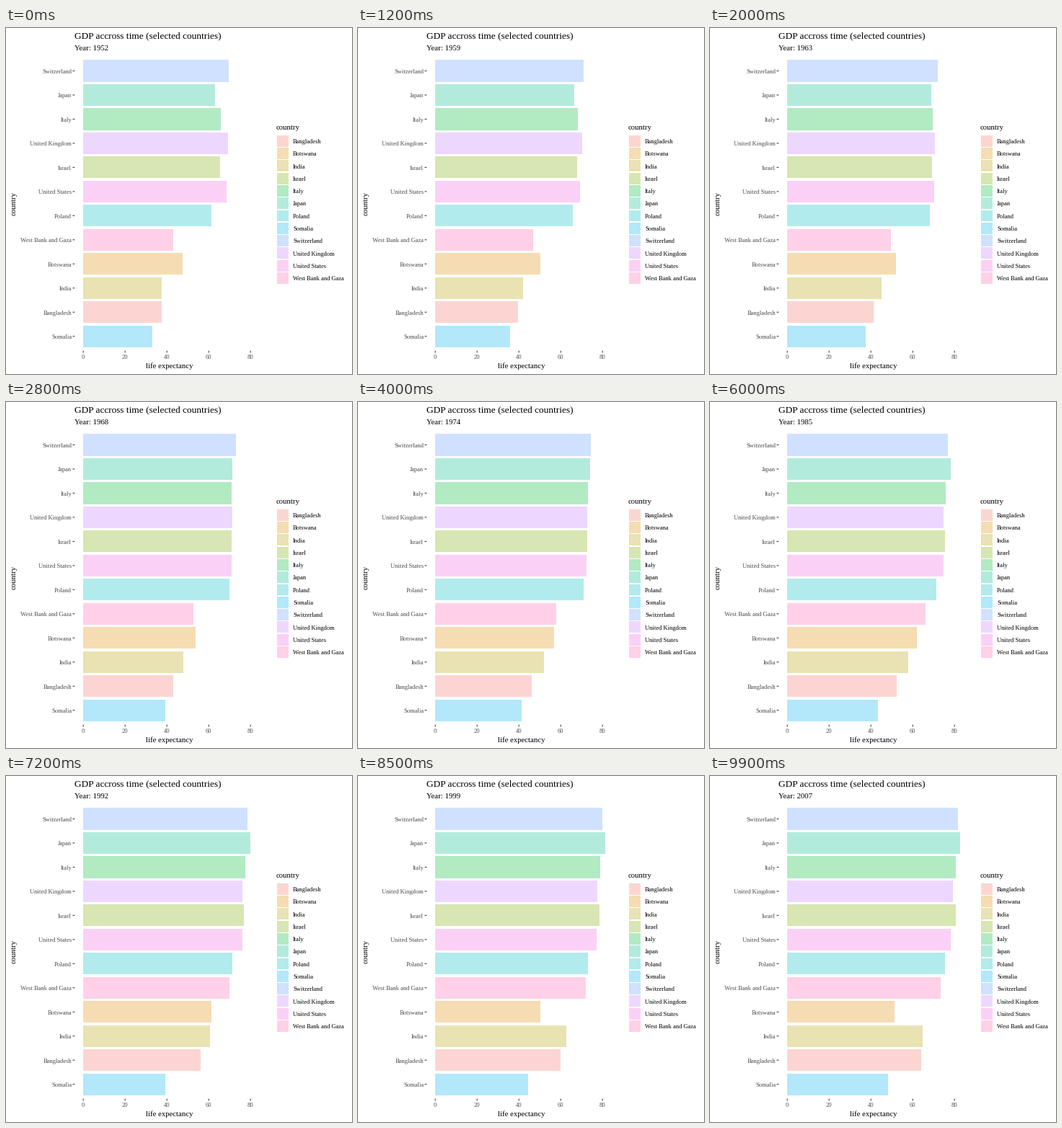
Recreate the animation shown at these times as a matplotlib script. Size 480 by 480 pixels, loop 10 s.

```python
import matplotlib.pyplot as plt
import numpy as np
from matplotlib.animation import FuncAnimation
from matplotlib.patches import Rectangle

plt.rcParams["font.family"] = "Liberation Serif"

SIZE, DPI = 480, 72
FRAMES, INTERVAL = 100, 100
YEARS = np.arange(1952, 2008, 5)

X0, X_UNIT = 107.2, 2.9          # zero line, pixels per year of life
ROW0, ROW = 59.52, 33.47         # first bar centre, bar pitch
LEFT, BOTTOM, TICK = 95.3, 447.7, 2.75
KEY_X, KEY_Y, KEY, PAD = 375.2, 148.2, 17.28, 0.71
SMALL, MEDIUM, LARGE = 8.45, 10.8, 13.4
GREY = "#4D4D4D"


def life(start, end, bend=0, skew=0, dip=0, when=2000, spread=1):
    """Straight trend, bowed by two sine waves, with an optional crisis."""
    u = (YEARS - YEARS[0]) / (YEARS[-1] - YEARS[0])
    trend = start + (end - start) * u
    bow = bend * np.sin(np.pi * u) + skew * np.sin(2 * np.pi * u)
    return trend + bow - dip * np.exp(-((YEARS - when) / spread) ** 2 / 2)


LIFE = {
    "Switzerland": life(69.6, 81.7),
    "Japan": life(63, 82.6, 3.4),
    "Italy": life(65.9, 80.5, 1.2),
    "United Kingdom": life(69.2, 79.4, -0.8),
    "Israel": life(65.4, 80.7, 0.9, 0.4),
    "United States": life(68.4, 78.2, 0.2, -0.4),
    "Poland": life(61.3, 75.6, 2.8, 2.4),
    "West Bank and Gaza": life(43.2, 73.4, 3.7, -1.9),
    "Botswana": life(47.6, 71.5, 0, -0.5, dip=24, when=2003.4, spread=6.1),
    "India": life(37.4, 64.7, 3.9, -0.3),
    "Bangladesh": life(37.5, 64.1, -1.8, -0.5),
    "Somalia": life(33, 48.2, 1.9, 0.4, dip=6.6, when=1993.6, spread=3),
}


def hcl(hue, chroma=100, lum=65):
    """Polar CIELUV colour as sRGB."""
    h = np.radians(hue)
    u = chroma * np.cos(h) / (13 * lum) + 0.1978
    v = chroma * np.sin(h) / (13 * lum) + 0.4683
    y = ((lum + 16) / 116) ** 3
    x, z = y * 9 * u / (4 * v), y * (12 - 3 * u - 20 * v) / (4 * v)
    rgb = np.clip([3.2405 * x - 1.5372 * y - 0.4985 * z,
                   -0.9693 * x + 1.8760 * y + 0.0416 * z,
                   0.0556 * x - 0.2040 * y + 1.0573 * z], 0, 1)
    return np.where(rgb > 0.0031308,
                    1.055 * rgb ** (1 / 2.4) - 0.055, 12.92 * rgb)


COLORS = {name: hcl(15 + 360 * i / len(LIFE))
          for i, name in enumerate(sorted(LIFE))}

fig = plt.figure(figsize=(SIZE / DPI, SIZE / DPI), dpi=DPI, facecolor="white")
ax = fig.add_axes([0, 0, 1, 1])
ax.set(xlim=(0, SIZE), ylim=(SIZE, 0))
ax.axis("off")


def text(x, y, s, size=SMALL, va="baseline", **kw):
    return ax.text(x, y, s, size=size, va=va, **kw)


def box(x, y, w, h, color):
    return ax.add_patch(Rectangle((x, y), w, h, facecolor=color, alpha=0.3,
                                  linewidth=0, antialiased=False, snap=True))


def tick(xs, ys):
    ax.plot(xs, ys, color="#333333", lw=1.07, solid_capstyle="butt",
            snap=False)


text(95, 14, "GDP accross time (selected countries)", LARGE)
subtitle = text(95, 31, "", MEDIUM)
text(227, 472, "life expectancy", MEDIUM, ha="center")
text(15.5, 243, "country", MEDIUM, va="center", ha="right", rotation=90)
text(375, 141, "country", MEDIUM)

for value in range(0, 81, 20):
    x = X0 + value * X_UNIT
    tick([x, x], [BOTTOM, BOTTOM + TICK])
    text(x, 459, str(value), color=GREY, ha="center")

bars = {}
for i, name in enumerate(LIFE):
    y = ROW0 + i * ROW
    bars[name] = box(X0, y - 0.45 * ROW, 0, 0.9 * ROW, COLORS[name])
    tick([LEFT - TICK, LEFT], [y, y])
    text(91, y + 3.5, name, color=GREY, ha="right")

for i, (name, color) in enumerate(COLORS.items()):
    y = KEY_Y + i * KEY
    box(KEY_X + PAD, y + PAD, KEY - 2 * PAD, KEY - 2 * PAD, color)
    text(398, y + KEY / 2 + 3.2, name)


def update(frame):
    year = YEARS[0] + (YEARS[-1] - YEARS[0]) * frame / (FRAMES - 1)
    for name, bar in bars.items():
        bar.set_width(X_UNIT * np.interp(year, YEARS, LIFE[name]))
    subtitle.set_text(f"Year: {round(year)}")
    return [*bars.values(), subtitle]


anim = FuncAnimation(fig, update, frames=FRAMES, interval=INTERVAL,
                     init_func=lambda: update(0), repeat=True, repeat_delay=0)
plt.show()
```
